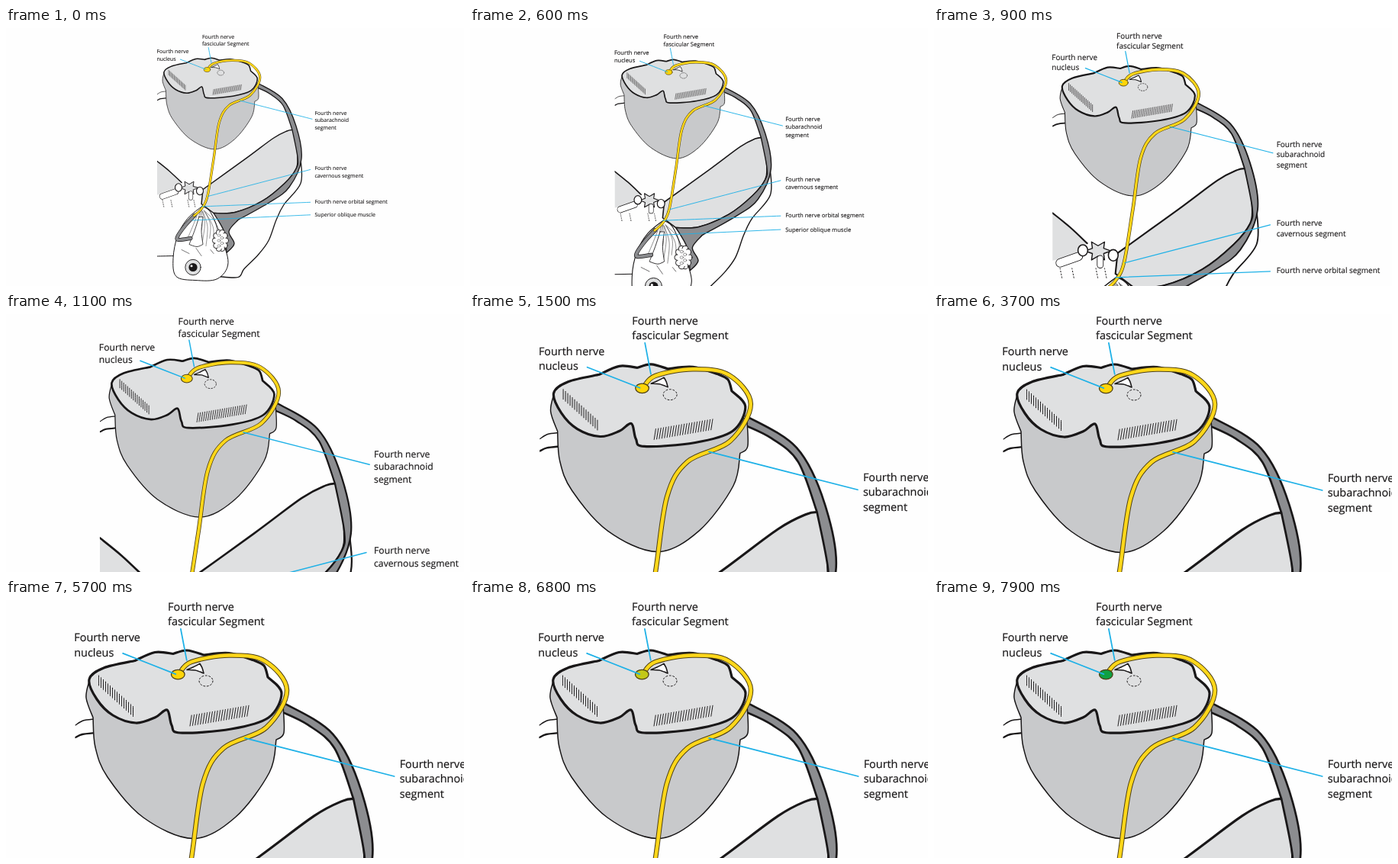
An HTML page for the animation above (8 s loop, 600 by 338 pixels).

```html
<!DOCTYPE html>
<html lang="en">
<head>
<meta charset="utf-8">
<title>Fourth nerve pathway</title>
<style>
html, body { margin: 0; width: 100%; height: 100%; overflow: hidden; background: #fefefe; }
svg { display: block; width: 100vw; height: 100vh; }
path, ellipse, circle { stroke-linecap: round; stroke-linejoin: round; }
text { font: 7px "Open Sans", "Noto Sans", sans-serif; fill: #1c1a1b; stroke: #1c1a1b; stroke-width: .1px; text-rendering: geometricPrecision; }
</style>
</head>
<body>
<svg viewBox="0 0 600 338">
  <clipPath id="crop"><rect x="198" y="0" width="402" height="338"/></clipPath>
  <g id="camera">
    <g clip-path="url(#crop)">
      <g id="orbit"></g>
      <g id="brain"></g>
    </g>
    <g id="leads"></g>
    <g id="labels"></g>
  </g>
</svg>
<script>
const LOOP = 8000, STEP = 100;
const ZOOM = { start: 360, length: 1210 };
const WIDE = { scale: 1, x: 0, y: -0.5 };
const CLOSE = { scale: 2.06, x: -317.4, y: -15.8 };
const TINT = { start: 6700, length: 400, from: [255, 213, 8], to: [14, 160, 66] };
const INK = "#191718", LIGHT = "#dfe0e1", MID = "#c8c9cb", DARK = "#8c8d90";
const YELLOW = "#ffd71a", BROWN = "#4d4015", CYAN = "#1eb1e7", WHITE = "#fff";

const byId = id => document.getElementById(id);
const place = ({ scale, x, y }) => `translate(${x} ${y}) scale(${scale})`;

function add(parent, tag, attrs) {
  const el = document.createElementNS("http://www.w3.org/2000/svg", tag);
  for (const key in attrs) el.setAttribute(key, attrs[key]);
  return parent.appendChild(el);
}

// Smooth curve through points; "/" turns the point before it into a corner.
function spline(text) {
  let d = "", last;
  for (const part of text.split("/")) {
    const p = part.trim().split(/\s+/).map(s => s.split(",").map(Number));
    if (last) p.unshift(last);
    else d = "M" + p[0];
    for (let i = 0; i < p.length - 1; i++) {
      const a = p[i - 1] || p[i], b = p[i], c = p[i + 1], e = p[i + 2] || c;
      const c1 = b.map((v, k) => v + (c[k] - a[k]) / 6);
      const c2 = c.map((v, k) => v - (e[k] - b[k]) / 6);
      d += `C${c1} ${c2} ${c}`;
    }
    last = p[p.length - 1];
  }
  return d;
}

function line(parent, points, width, stroke = INK) {
  return add(parent, "path", { d: spline(points), fill: "none", stroke, "stroke-width": width });
}

function shape(parent, points, fill, width, stroke = INK) {
  return add(parent, "path", { d: spline(points) + "Z", fill, stroke, "stroke-width": width });
}

function oval(parent, cx, cy, rx, ry, fill, width = 0, stroke = INK) {
  return add(parent, "ellipse", { cx, cy, rx, ry, fill, stroke, "stroke-width": width });
}

function tube(parent, points, width, fill, edge, stroke = INK) {
  line(parent, points, width + 2 * edge, stroke);
  line(parent, points, width, fill);
}

// Row of short strokes: each starts dx, dy further on and has the run lean, drop.
function hatch(parent, count, x, y, dx, dy, lean, drop) {
  for (let i = 0; i < count; i++, x += dx, y += dy)
    line(parent, `${x},${y} ${x + lean},${y + drop}`, 1);
}

function drawBones(g) {
  line(g, "386,172 386,204 364,232 354,252 344,279 330,298 312,316 304,327 278,326", 1.3);
  shape(g, "198,175 214,188 230,203 / 220,212 198,219", LIGHT, 0);
  line(g, "198,175 214,188 230,203", 1.5);
  line(g, "198,299.5 221,299", 1);

  shape(g, "258,212 314,171.7 350,145 368,135.5 376,134 / 380,152 382,170 380,185 365,204 336,227 300,242 272,243 / 256,231", LIGHT, 1.5);
  shape(g, "329.8,72.7 362,93 380,129 387,172 371,209 345,229 304,252 / 292,267 299,283 289,295 / 286,268 272,243 / 300,242 336,227 365,204 380,185 382,170 375,134 / 363,102 346,87 328.8,78.5", DARK, 1.3);
}

function drawChiasm(g) {
  tube(g, "205,221 222,215", 7, WHITE, 0.6);
  const spikes = Array.from({ length: 12 }, (_, i) => {
    const a = i * Math.PI / 6, r = i % 2 ? 6 : 12;
    return `${240 + r * Math.cos(a)},${210 + r * 0.8 * Math.sin(a)}`;
  });
  shape(g, spikes.join(" / "), LIGHT, 1);
  tube(g, "242,217 242,223", 5, WHITE, 0.6);
  oval(g, 226, 209.5, 4.5, 5.2, WHITE, 1.1);
  oval(g, 254, 214, 4.5, 5.2, WHITE, 1.1);
  for (const x of [205, 216, 238, 246])
    line(g, `${x},226 ${x + 2},236`, 0.7).setAttribute("stroke-dasharray", "1 1.6");
}

function drawEye(g) {
  shape(g, "257,234 238,250 225,272 219,302 223,326 248,331 277,329 291,308 280,270 268,242 257,234", WHITE, 1);

  // Muscle fibres fan out from the apex
  for (let i = 0; i < 9; i++)
    line(g, `${253 + i},${239 + i % 3} ${246 + i * 3.6},${257 + i % 2 * 4} ${238 + i * 4.8},${276 + i % 3 * 5}`, 0.45);
  shape(g, "253,248 258,248 / 256,266 258,284 / 250,287 240,284 / 247,266 253,248", WHITE, 0.8);
  for (let i = 0; i < 3; i++)
    line(g, `${230 + i * 19},${291 - i % 2 * 2} ${240 + i * 16},${296 + i % 2 * 3}`, 0.6);

  // Lacrimal gland: a ring of lobes around a pale middle
  for (let i = 0; i < 10; i++) {
    const a = i * Math.PI / 5;
    oval(g, 281 + 7 * Math.cos(a), 279 + 11 * Math.sin(a), 3.6, 3.6, WHITE, 0.9);
  }
  oval(g, 281, 279, 7, 11, WHITE);
  for (let i = 0; i < 5; i++) oval(g, 279 + i % 2 * 4, 272 + i * 3.5, 2, 1.6, "none", 0.4);

  // Superior oblique muscle
  tube(g, "247,246 235,259 225,273 226,278 242,276", 3.6, DARK, 0.7);

  oval(g, 245, 314, 10.2, 10.2, LIGHT, 0.9);
  oval(g, 245, 314, 5.6, 5.6, INK);
  oval(g, 243, 312.3, 1.5, 1.5, WHITE);
}

// The brain is laid out in close-up coordinates.
function drawBrain(g) {
  const { scale, x, y } = CLOSE;
  g.setAttribute("transform", `scale(${1 / scale}) translate(${-x} ${-y})`);
  line(g, "91,164 101,158 116,156", 1.4);
  line(g, "91,180 100,176 117,174", 2.4);

  shape(g, "109,106 105,128 114,154 / 117,193 133,232 180,285 245,312.5 300,285 345,226 354,183 / 364,174 363,138 / 240,110", MID, 1.5);
  shape(g, "169,79.5 195,68.5 219,70.5 / 237,66 259,72 / 292,69.5 325,79 / 338,86 343,101 / 361,122 344,154 295,169 228,174 217,164 211,144 195,154 170,161 140,151 119,130 109,104 128,89 169,79.5", LIGHT, 3.2);
  hatch(g, 16, 121.5, 99, 3, 2.7, 0, 13);
  hatch(g, 23, 241, 165, 3.4, -0.58, 2.2, -14);

  shape(g, "237,91.5 245,88 254,83.5 / 257,89 259,96 / 248,92 237,91.5", WHITE, 1.6);
  oval(g, 262, 106, 9, 7, "none", 1).setAttribute("stroke-dasharray", "2 2.6");

  tube(g, "227,96 243,81 292,72.5 339,80 368,118 341,167 285,194 258,240 243,338 226.5,438 211,472 190,492", 4.5, YELLOW, 1, BROWN);
  return oval(g, 225.3, 97.6, 8.8, 6.3, YELLOW, 1.3, BROWN);
}

// Text rows with a lead line from the text side to the part they name.
function label(x, y, text, from, to) {
  line(byId("leads"), `${from} ${to}`, 0.85, CYAN);
  text.split("|").forEach((row, i) => {
    add(byId("labels"), "text", { x, y: y + i * 9.5 }).textContent = row;
  });
}

function drawLabels() {
  label(257, 14.4, "Fourth nerve|fascicular Segment", "265.2,26.1", "269,46");
  label(197.4, 33.9, "Fourth nerve|nucleus", "228.4,41.6", "262,54.8");
  label(404.4, 114.3, "Fourth nerve|subarachnoid|segment", "401,119.8", "306,95.5");
  label(404.4, 186.9, "Fourth nerve|cavernous segment", "398.6,186", "264.5,221");
  label(404.4, 230.5, "Fourth nerve orbital segment", "398.6,228.8", "256,234.4");
  label(404.4, 247.6, "Superior oblique muscle", "398.6,245.3", "244,252.5");
}

const mix = (a, b, u) => a + (b - a) * u;
const progress = (t, { start, length }) => Math.min(1, Math.max(0, (t - start) / length));
const easeInOut = u => u < 0.5 ? 2 * u * u : 1 - 2 * (1 - u) ** 2;

drawBones(byId("orbit"));
drawChiasm(byId("orbit"));
drawEye(byId("orbit"));
const nucleus = drawBrain(byId("brain"));
drawLabels();

function render(t) {
  const zoom = easeInOut(progress(t, ZOOM));
  const view = {};
  for (const key in WIDE) view[key] = mix(WIDE[key], CLOSE[key], zoom);
  byId("camera").setAttribute("transform", place(view));
  const tint = progress(t, TINT);
  nucleus.setAttribute("fill", `rgb(${TINT.from.map((v, i) => Math.round(mix(v, TINT.to[i], tint)))})`);
}

const origin = performance.now();
function tick() {
  const t = (performance.now() - origin) % LOOP;
  render(Math.floor(t / STEP) * STEP);
  requestAnimationFrame(tick);
}
tick();
</script>
</body>
</html>
```
